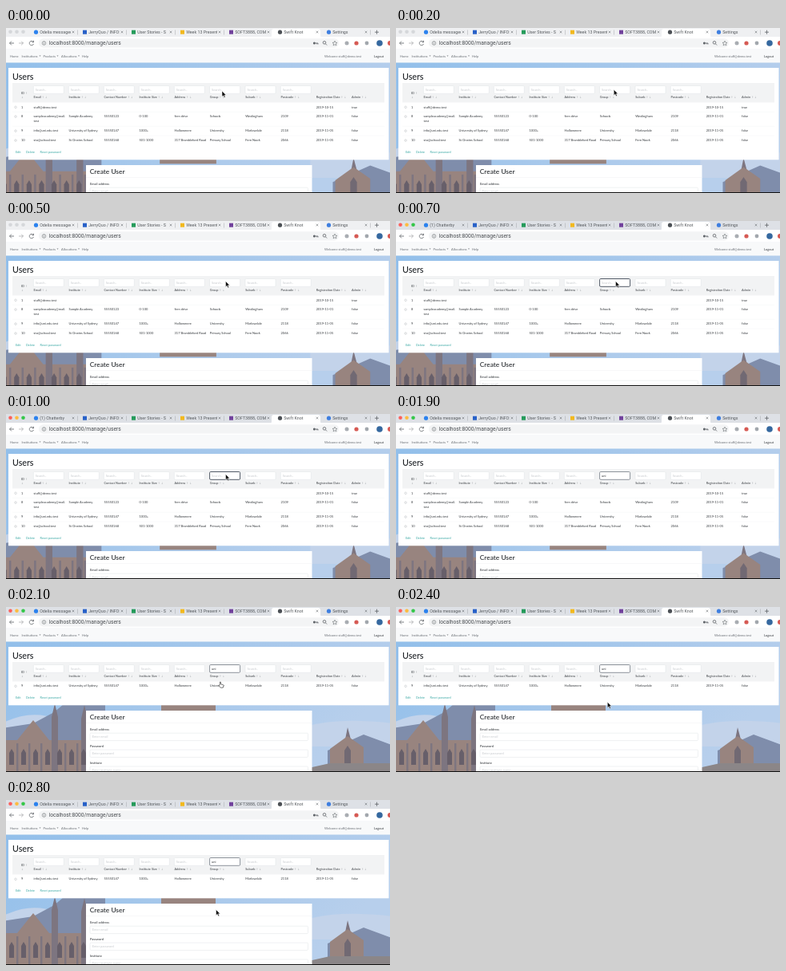
An HTML page that plays this animation: 480x207 px, repeating every 2900 ms.

```html
<!DOCTYPE html>
<html lang="en">
<head>
<meta charset="utf-8">
<title>Manage users</title>
<style>
html, body { margin: 0; width: 100%; height: 100%; overflow: hidden; background: #fff; }
svg { display: block; width: 100vw; height: 100vh; }
text { font-family: Lato, "Open Sans", sans-serif; font-size: 4px; fill: #34383c; white-space: pre; }
.chrome { font-family: Roboto, Arial, sans-serif; font-size: 5.3px; fill: #55595d; }
.url { font-family: Roboto, Arial, sans-serif; font-size: 6.7px; fill: #4a4e52; }
.nav { fill: #6b7076; }
.title { font-size: 10.7px; font-weight: 500; fill: #212529; }
.subtitle { font-size: 8.4px; font-weight: 500; fill: #212529; }
.head { font-size: 3.9px; font-weight: 500; fill: #4a4e52; }
.sort { font-family: "DejaVu Sans", sans-serif; font-size: 3.4px; fill: #a5a8ac; }
.hint { fill: #c6c9cd; }
.link { font-size: 3.8px; fill: #3aa8a4; }
.field { fill: #fff; stroke: #dfe2e5; stroke-width: .5; }
.icon { fill: none; stroke: #5f6368; stroke-width: .8; }
</style>
</head>
<body>
<svg id="stage" viewBox="0 0 480 207" xmlns="http://www.w3.org/2000/svg"></svg>
<script>
const LOOP = 2900;
const stage = document.getElementById('stage');

const rect = (x, y, w, h, fill, extra = '') =>
  `<rect x="${x}" y="${y}" width="${w}" height="${h}" fill="${fill}" ${extra}/>`;
const dot = (x, y, r, fill, extra = '') => `<circle cx="${x}" cy="${y}" r="${r}" fill="${fill}" ${extra}/>`;
const path = (d, attrs) => `<path d="${d}" ${attrs}/>`;
const shape = (d, fill) => path(d, `fill="${fill}"`);
const text = (x, y, value, cls = '', extra = '') =>
  `<text x="${x}" y="${y}" class="${cls}" ${extra}>${value}</text>`;
const field = (x, y, w, h, extra = '') =>
  `<rect x="${x}" y="${y}" width="${w}" height="${h}" rx="1.2" class="field" ${extra}/>`;

const stone = '#98847f', shade = '#7d7580', slate = '#7f8dab';

// Soft, flat rendering of a sandstone college under a pale sky.
function backdrop() {
  let out = `<defs><linearGradient id="sky" x2="1" y2=".35">
      <stop stop-color="#92bfea"/><stop offset="1" stop-color="#b7cfec"/>
    </linearGradient></defs>` + rect(0, 43, 480, 164, 'url(#sky)') + '<g id="campus">' +
    shape('M-5 146Q30 128 62 140V160H-5ZM375 150Q415 138 485 146V175H375Z', '#c3d3ea') +
    rect(194, 118, 68, 40, stone) +
    shape('M-5 152L34 146L60 132L72 122H124V210H-5Z', slate) +
    shape('M-5 167H14L34 142L54 167H124V215H-5Z', stone) +
    shape('M57 215V138L61 121L65 138V215ZM94 215V140L98 123L102 140V215Z', shade);
  for (let x = 4; x < 100; x += 15) {
    out += shape(`M${x} 198V183l3 -5l3 5V198Z`, '#675f6a') + rect(x + 9, 171, 2.4, 40, shade);
  }
  out += shape('M424 166L427 151L431 166V178H424Z', shade) +
    shape('M402 215V180L447 160L490 176V215Z', slate) +
    shape('M405 203V178L427 162L447 176V203Z', stone) +
    shape('M378 215V202L405 196H490V215Z', '#8b8688') +
    shape('M423 196V180l4 -6l4 6V196Z', '#716973');
  return out + '</g>';
}

function browser() {
  const tabs = [
    ['', '#2c82ee', 1], ['JerryQuo / INFO5', '#2861c8', 0], ['User Stories - S', '#259b5b', 0],
    ['Week 13 Present', '#f2b91f', 0], ['SOFT3888, COM', '#71419c', 0],
    ['Swift Knot', '#4c5055', 1], ['Settings', '#3f7fe0', 1]
  ];
  let out = rect(0, 0, 480, 12, '#dee1e6', 'id="tabBar"') + rect(0, 11, 480, 15, '#fff') +
    shape('M330 12Q332 12 332 9V4Q332 1 335 1H390Q393 1 393 4V9Q393 12 395 12Z', '#fff');
  for (const x of [5.5, 13.5, 21.5]) out += dot(x, 4.8, 2.3, '', 'class="light"');
  tabs.forEach(([label, color, round], i) => {
    const x = 35 + i * 61;
    out += round ? dot(x + 2.5, 5.2, 2.6, color) : rect(x, 2.7, 5, 5, color);
    out += `<clipPath id="tab${i}"><rect x="${x + 7}" width="39" height="12"/></clipPath>` +
      text(x + 7.2, 7.2, label, 'chrome', `clip-path="url(#tab${i})" ${i ? '' : 'id="alertTab"'}`) +
      path(`M${x + 47.7} 3.8l2.6 2.6m0 -2.6l-2.6 2.6`, 'class="icon" style="stroke-width:.55"');
    if (i < 4 || i === 6) out += rect(x + 54, 2.5, .5, 6, '#a4a7ac');
  });
  out += path('M461 5.2h5m-2.5 -2.5v5', 'class="icon"') +
    path('M10 19H4.5m2.4 -2.4L4.5 19l2.4 2.4', 'class="icon"') +
    path('M16 19h5.5m-2.4 -2.4L21.5 19l-2.4 2.4', 'class="icon" opacity=".5"') +
    path('M34.1 17.4A2.7 2.7 0 1 0 34.5 20M34.5 15.8v2.1h-2.1', 'class="icon"') +
    rect(41, 13.2, 375, 11.3, '#f3f4f5', 'rx="5.6"') +
    '<circle cx="47.5" cy="19" r="2.3" class="icon" style="stroke-width:.55"/>' +
    rect(47.2, 18.6, .6, 1.7, '#5f6368') + rect(47.2, 17.4, .6, .6, '#5f6368') +
    text(53.6, 21.3, 'localhost:8000/manage/users', 'url') +
    path('M386.5 19h3.5v1.5M388.6 19v1.3', 'class="icon"') + dot(385.4, 19, 1.5, '#5f6368') +
    '<circle cx="398" cy="18.3" r="1.8" class="icon"/>' + path('M399.3 19.7l1.8 1.8', 'class="icon"') +
    path('M411 16.2l.9 2 2.1 .2-1.6 1.4 .5 2.1-1.9-1.2-1.9 1.2 .5-2.1-1.6-1.4 2.1-.2Z', 'class="icon" style="stroke-width:.55"') +
    dot(426, 19, 2.5, '#a9adb2') + dot(438, 19, 2.6, '#d65a54') + dot(451, 19, 2.4, '#a2a7ad') +
    dot(467, 19, 3.8, '#35689f') + dot(480, 19, 3, '#d65a54');
  return out;
}

function navigation() {
  let out = rect(0, 25.5, 480, 18, '#f8f9fa') + rect(0, 25.5, 480, .5, '#dadde0');
  [[5, 'Home'], [19.5, 'Institutions', 41.5], [46.5, 'Products', 63.5], [69, 'Allocations', 90], [95, 'Help']]
    .forEach(([x, label, caret]) => {
      out += text(x, 36.5, label, 'nav');
      if (caret) out += shape(`M${caret} 34.5h2l-1 1.3Z`, '#6b7076');
    });
  return out + text(398, 36.5, 'Welcome staff@demo.test', 'nav') + text(460, 36.5, 'Logout');
}

const columns = [34.5, 78.5, 122.5, 166.5, 210.5, 254.8, 299.2, 343.5, 387.7, 432];
const labels = ['Email', 'Institute', 'Contact Number', 'Institute Size', 'Address',
  'Group', 'Suburb', 'Postcode', 'Registration Date', 'Admin'];
const users = [
  [100.5, 1, 'staff@demo.test', '', '', '', '', '', '', '', '2019-10-15', 'true'],
  [112.3, 8, 'sampleacademy@mail.', 'Sample Academy', '55550123', '0-100', 'fern drive', 'Schools', 'Wexlingham', '2109', '2019-11-01', 'false'],
  [130.3, 9, 'info@uni.edu.test', 'University of Sydney', '55550147', '1000+', 'Hollowmere', 'University', 'Marlowdale', '2118', '2019-11-05', 'false'],
  [142.2, 10, 'sto@school.test', 'St Orwins School', '55550168', '501-1000', '317 Brambleford Road', 'Primary School', 'Fern Nook', '2066', '2019-11-05', 'false']
];

function userRow([y, id, ...cells]) {
  return `<g class="row" data-group="${cells[5]}">` +
    rect(8, y - 7.4, 465, .4, '#eff0f2') +
    `<circle cx="12" cy="${y - 1.2}" r="1.3" fill="#fff" stroke="#b5b9bd" stroke-width=".5"/>` +
    text(19, y, id) + cells.map((cell, i) => text(columns[i], y, cell)).join('') +
    (id === 8 ? text(columns[0], y + 5.8, 'test') : '') + '</g>';
}

function userTable() {
  let out = '<rect id="panel" x="3" y="50" width="475.5" height="115.3" fill="#fff"/>' +
    text(8, 65, 'Users', 'title') + rect(8, 69, 465, 24, '#f2f3f4') +
    text(19, 82.5, 'ID <tspan class="sort">↑</tspan>', 'head') + text(19, 88.3, '↓', 'sort');
  labels.forEach((label, i) => {
    const x = columns[i];
    out += text(x, 88.3, `${label} <tspan class="sort">↑ ↓</tspan>`, 'head');
    if (i > 7) return;
    const search = i === 5;
    out += field(x - .2, 72.5, 38, 9.8, search ? 'id="searchBox"' : '') +
      text(x + 2.2, 78.9, 'Search..', 'hint', search ? 'id="searchText"' : '');
  });
  out += users.map(userRow).join('') + '<g id="actions">';
  [[12, 'Edit'], [25, 'Delete'], [42.5, 'Reset password']].forEach(([x, label]) => {
    out += text(x, 157, label, 'link');
  });
  return out + '</g>';
}

function createForm() {
  let out = '<g id="form">' + rect(100, 130, 282.5, 90, '#fff') +
    text(104.8, 140.8, 'Create User', 'subtitle') + rect(100, 145.5, 282.5, .4, '#eceeef');
  [['Email address', 'Enter email'], ['Password', 'Enter password'], ['Institute', 'Enter institute name']]
    .forEach(([label, hint], i) => {
      const y = 155 + i * 20.9;
      out += text(105, y, label, '', 'font-weight="500"') +
        field(105, y + 3.2, 272.5, 9.4) + text(107.7, y + 9.3, hint, 'hint');
    });
  return out + '</g>';
}

const arrow = path('M0 0V7.2L1.7 5.7L2.9 8.3L4.1 7.7L3 5.2H5.2Z',
  'id="arrow" fill="#111" stroke="#fff" stroke-width=".5"');
const hand = path('M.5 0Q1.5 -.4 1.6 .8V3L4.5 3.6Q5.3 4 5 5L4.2 7.2H1.2L-1 4.7Q-.8 3.6 0 4.3Z',
  'id="hand" fill="#fff" stroke="#222" stroke-width=".6"');

stage.innerHTML = backdrop() + navigation() + browser() + userTable() + createForm() +
  `<g id="pointer">${arrow}${hand}</g>` + rect(0, 206, 480, 1, '#111');

const part = id => document.getElementById(id);
const [campus, tabBar, alertTab, panel, searchBox, searchText, actions, form, pointer, arrowShape, handShape] =
  ['campus', 'tabBar', 'alertTab', 'panel', 'searchBox', 'searchText', 'actions', 'form', 'pointer', 'arrow', 'hand'].map(part);
const rows = [...document.querySelectorAll('.row')];
const lights = [...document.querySelectorAll('.light')];
const lightColors = ['#fc605c', '#fdbc40', '#34c749'];
const show = (node, visible) => node.setAttribute('visibility', visible ? 'visible' : 'hidden');
const shift = (node, x, y) => node.setAttribute('transform', `translate(${x} ${y})`);

// time, x, y
const route = [[0, 270, 79], [400, 274.5, 75.5], [2100, 267, 94], [2600, 262.5, 136], [2800, 262.5, 137.5], [LOOP, 262.5, 137.5]];

function pointerAt(t) {
  if (t >= 400 && t < 2100) return route[1].slice(1);
  const next = route.findIndex(stop => stop[0] > t);
  const a = route[next - 1], b = route[next];
  const p = (t - a[0]) / (b[0] - a[0]);
  return [a[1] + (b[1] - a[1]) * p, a[2] + (b[2] - a[2]) * p];
}

function render(time) {
  const t = Math.floor((time % LOOP) / 100) * 100;
  const focused = t >= 700;
  const filtered = t >= 2100;
  const query = 'uni'.slice(0, Math.max(0, Math.floor((t - 1200) / 100)));

  alertTab.textContent = t >= 700 && t < 1500 ? '(1) Chatterby' : 'Odelia messaged you';
  tabBar.setAttribute('fill', focused ? '#dee1e6' : '#eff0f2');
  lights.forEach((light, i) => light.setAttribute('fill', focused ? lightColors[i] : '#d5d7da'));
  searchBox.style.stroke = focused ? (query ? '#8d939b' : '#525b67') : '';
  searchBox.style.strokeWidth = focused ? 1 : '';
  searchText.textContent = query || 'Search..';
  searchText.setAttribute('class', query ? '' : 'hint');

  for (const row of rows) {
    const match = row.dataset.group === 'University';
    show(row, !filtered || match);
    shift(row, 0, filtered && match ? -29.8 : 0);
  }
  panel.setAttribute('height', filtered ? 73.3 : 115.3);
  shift(actions, 0, filtered ? -42 : 0);
  shift(form, 0, filtered ? 0 : 42);
  // The cover image grows with the page height.
  campus.setAttribute('transform', filtered ? '' : 'translate(-9.6 6) scale(1.04)');

  const overRow = t >= 2100 && t < 2200;
  const visible = t < 1300 || filtered;
  shift(pointer, ...pointerAt(t));
  show(arrowShape, visible && !overRow);
  show(handShape, visible && overRow);
}

function tick() {
  render(performance.now());
  requestAnimationFrame(tick);
}
tick();
</script>
</body>
</html>
```
